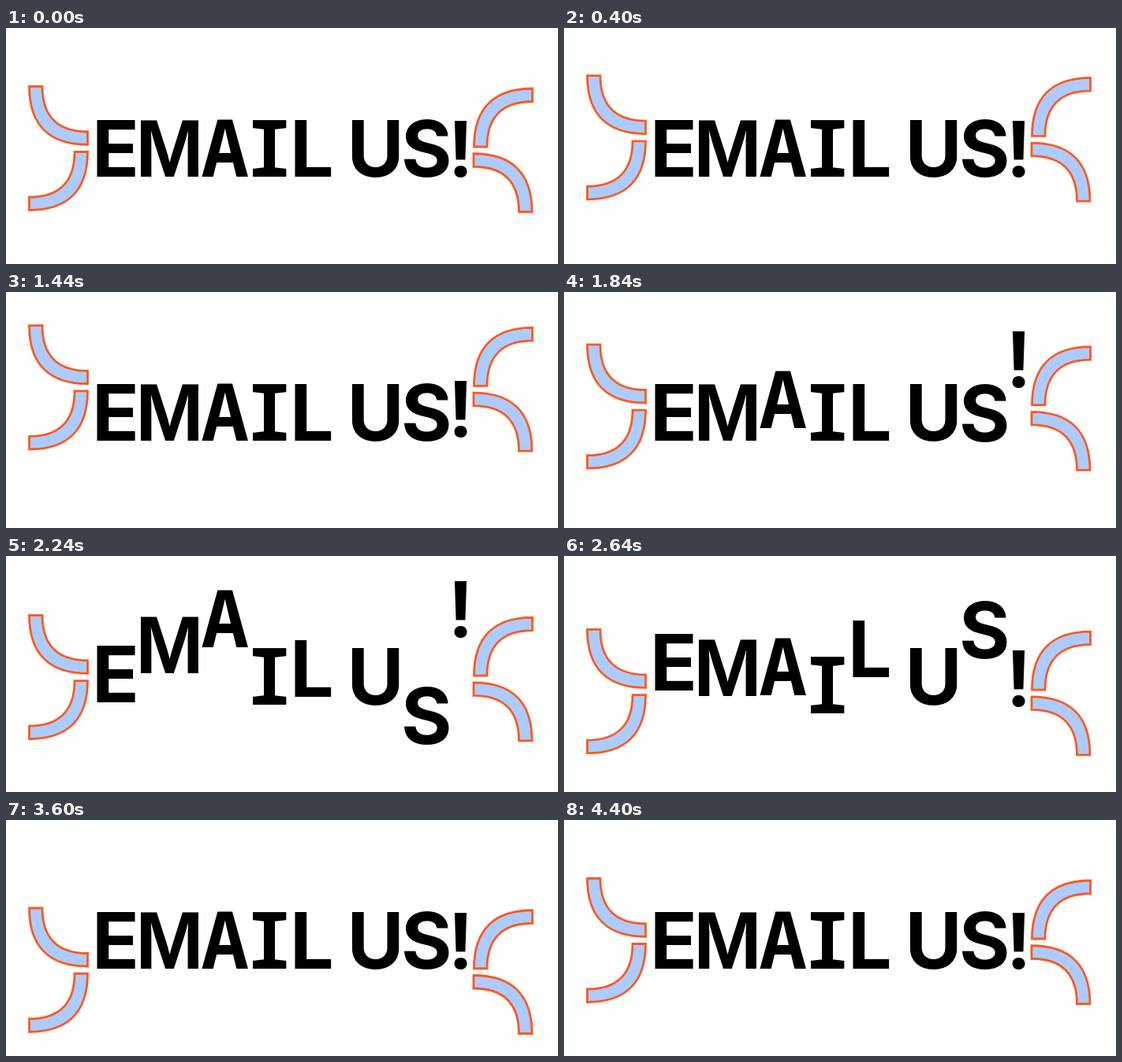
Recreate the animation shown at these times as an HTML page. Size 700 by 300 pixels, loop 4960 ms.

```html
<!DOCTYPE html>
<html lang="en">
<head>
<meta charset="utf-8">
<title>Email us!</title>
<style>
  html, body { margin: 0; width: 100%; height: 100%; overflow: hidden; background: #fff; }
  svg { display: block; width: 700px; height: 300px; }
  path { fill: #adcbff; stroke: #fb5a1e; stroke-width: 2.8; }
</style>
</head>
<body>
<svg viewBox="0 0 700 300" role="img" aria-label="EMAIL US!">
  <g id="arcs"></g>
  <g id="word"></g>
</svg>
<script>
const LOOP = 4960, STEP = 80, MOVE_END = 4400;
const CAP = 72, BASELINE = 189;
const SANS = ['700', 'Inter, "Liberation Sans", sans-serif'];
const NARROW = ['700', '"Liberation Sans", Arial, sans-serif'];
const MONO = ['700', '"Noto Sans Mono", "DejaVu Sans Mono", monospace'];
const ROUND = ['700', 'Roboto, "Open Sans", sans-serif'];

// Letter, centre of its ink, font, and [ms, vertical offset] keys.
const LETTERS = [
  ['E', 139.5, SANS, [[2000, 0], [3300, -37], [3580, 0]]],
  ['M', 207, NARROW, [[1960, 0], [2320, -45], [2800, 0]]],
  ['A', 278, MONO, [[1680, 0], [2200, -74], [2800, 0]]],
  ['I', 334.5, MONO, [[2480, 0], [2960, 45], [3520, 0]]],
  ['L', 389.5, SANS, [[2140, 0], [2480, -50], [2920, 0]]],
  ['U', 468.5, SANS, []],
  ['S', 533.5, SANS, [[1800, 0], [2260, 50], [2800, -87], [3280, 0]]],
  ['!', 577, ROUND, [[1320, 0], [2120, -93], [2960, 46], [3560, 0]]]
];
const ARC_KEYS = [[40, 0], [1020, -46], [2130, 0], [3280, 46.5], [4400, 0]];

// Bent bars: centre and the quadrant they bend through.
const ARCS = [
  [103.5, 74.25, -1, 1],
  [29.5, 157.5, 1, 1],
  [667.5, 151, -1, -1],
  [593, 233.75, 1, -1]
];
const OUTER = 74, INNER = 57.5, BULGE = 0.66;

const pen = document.createElement('canvas').getContext('2d');

function add(parent, name, attrs) {
  const node = document.createElementNS('http://www.w3.org/2000/svg', name);
  for (const key in attrs) node.setAttribute(key, attrs[key]);
  return document.getElementById(parent).appendChild(node);
}

function bar([x, y, sx, sy]) {
  const at = (dx, dy) => `${x + sx * dx} ${y + sy * dy} `;
  const out = OUTER * BULGE, inn = INNER * BULGE;
  return 'M' + at(OUTER, 0) +
    'C' + at(OUTER, out) + at(out, OUTER) + at(0, OUTER) +
    'L' + at(0, INNER) +
    'C' + at(inn, INNER) + at(INNER, inn) + at(INNER, 0) + 'Z';
}

function placeLetter([char, centre, [weight, family]]) {
  const measure = (text, size) => {
    pen.font = `${weight} ${size}px ${family}`;
    return pen.measureText(text);
  };
  const size = CAP * 200 / measure('E', 200).actualBoundingBoxAscent;
  const box = measure(char, size);
  const inkMiddle = (box.actualBoundingBoxRight - box.actualBoundingBoxLeft) / 2;
  const node = add('word', 'text', {
    x: centre - inkMiddle, y: BASELINE,
    'font-family': family, 'font-weight': weight, 'font-size': size
  });
  node.textContent = char;
  return node;
}

function offsetAt(keys, t) {
  for (let i = 1; i < keys.length; i++) {
    const [t0, y0] = keys[i - 1], [t1, y1] = keys[i];
    if (t >= t0 && t <= t1) {
      const ease = (1 - Math.cos(Math.PI * (t - t0) / (t1 - t0))) / 2;
      return y0 + (y1 - y0) * ease;
    }
  }
  return 0;
}

function shift(node, y) {
  node.setAttribute('transform', `translate(0 ${y.toFixed(2)})`);
}

ARCS.forEach(arc => add('arcs', 'path', { d: bar(arc) }));
const arcs = document.getElementById('arcs');
const glyphs = LETTERS.map(placeLetter);
const start = performance.now();

function draw() {
  const now = (performance.now() - start) % LOOP;
  const t = Math.min(Math.floor(now / STEP) * STEP, MOVE_END);
  shift(arcs, offsetAt(ARC_KEYS, t));
  glyphs.forEach((node, i) => shift(node, offsetAt(LETTERS[i][3], t)));
  requestAnimationFrame(draw);
}
draw();
</script>
</body>
</html>
```
